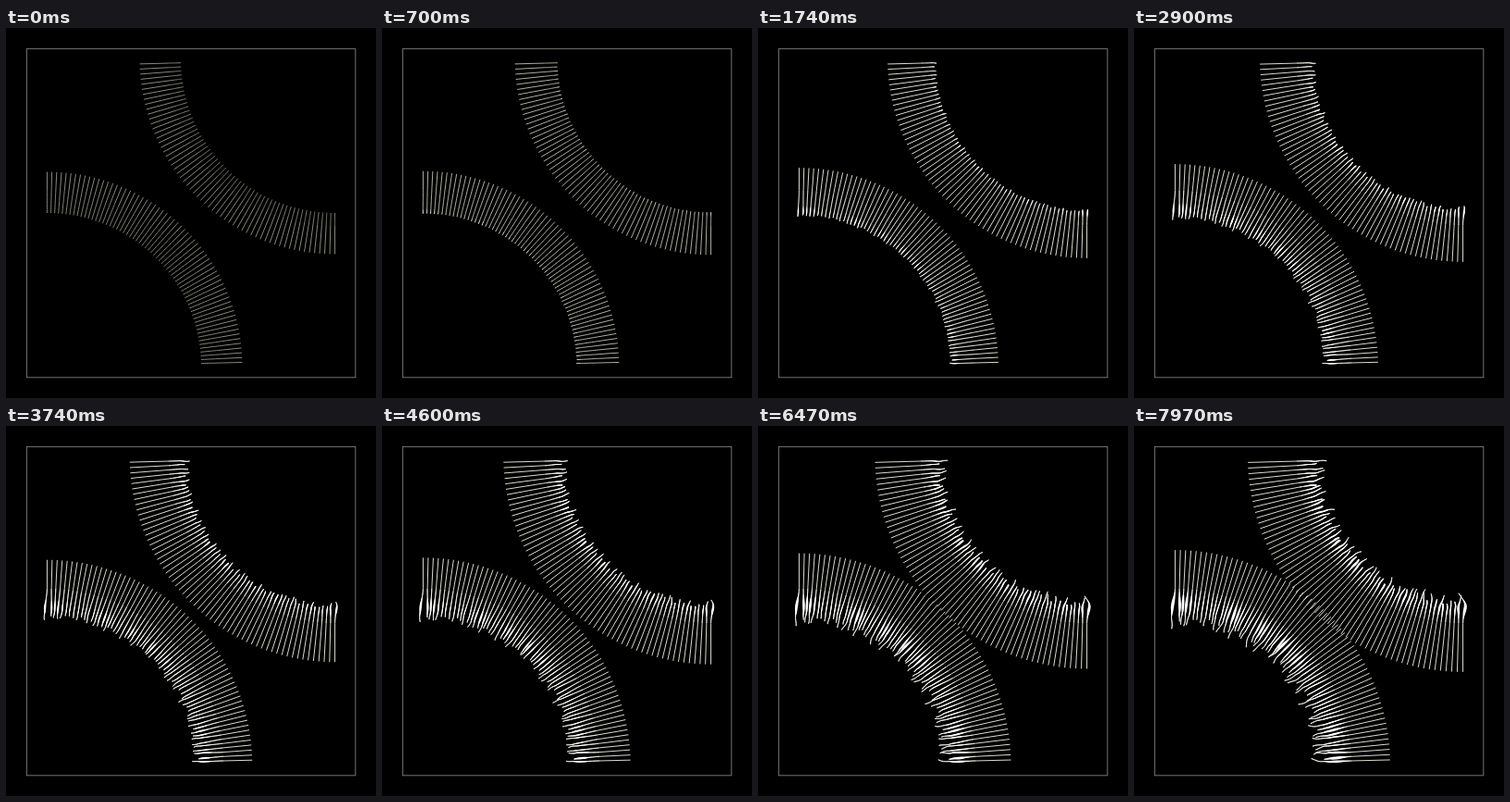
An HTML page that plays this animation: 400 by 400 pixels, repeating every 8000 ms.

```html
<!DOCTYPE html>
<html>
<head>
<meta charset="utf-8">
<title>Growing arcs</title>
<style>
  html, body { margin: 0; width: 100%; height: 100%; overflow: hidden; background: #000; }
  svg { display: block; width: 100%; height: 100%; }
</style>
</head>
<body>
<svg viewBox="0 0 400 400" fill="none">
  <rect x="22.4" y="22.4" width="355.4" height="355.4" stroke="#74746e"/>
  <path id="lines"/>
  <path id="tails" stroke="#fffffa" stroke-width="1.1" stroke-linejoin="round"/>
  <path id="blobs" fill="#fff"/>
</svg>
<script>
const LOOP = 8000, U = 400 / 18;
const INNER = 7.5 * U, OUTER = 9.5 * U;
const GROWTH = [[0, 0], [600, .6], [1230, 2.2], [1740, 4.4], [2900, 8.4], [4600, 13.2], [6470, 18], [8000, 21.5]];

// knots: places along the arc where the strokes gather, as index and strength
const ARCS = [
  {
    count: 64, bend: 191, shift: .35, spread: .5,
    knots: [[0, 1.2], [3, .9], [15, 1], [23, .8], [30, .9], [35, .7], [55, .8], [62, 1]]
  },
  {
    count: 60, bend: 180, shift: -.1, spread: .36,
    knots: [[0, 1.2], [6, .6], [15, .6], [21, .5], [30, .8], [37, .8], [47, .6], [53, .4]]
  }
];

const [lines, tails, blobs] = ['lines', 'tails', 'blobs'].map(id => document.getElementById(id));
const clamp = v => Math.max(0, Math.min(1, v));
const smooth = v => (v = clamp(v), v * v * (3 - 2 * v));

let seed = 11;
function rand() {
  seed = (seed * 16807) % 2147483647;
  return seed / 2147483647;
}

function makeStroke(arc, flip, i) {
  const knot = arc.knots.reduce((sum, [at, amp]) => sum + amp * Math.exp(-(((i - at) / 1.6) ** 2)), 0);
  const s = {
    arc,
    flip,
    angle: i * Math.PI / 2 / arc.count,
    width: .4 + .65 * Math.min(knot, 1.2),
    drift: (rand() - .5) * 2.4,
    curl: (rand() - .5) * .028,
    phase: rand() * 6.3,
    reach: .25 + .6 * rand()
  };
  if (i === 0) Object.assign(s, { reach: .9, drift: -3.2, curl: flip ? .022 : 0 });
  if (i === arc.count - 1) Object.assign(s, { reach: .9, drift: flip ? 0 : .5, curl: flip ? 0 : -.01 });
  return s;
}

const strokes = ARCS.flatMap((arc, flip) => Array.from({ length: arc.count }, (_, i) => makeStroke(arc, flip, i)));

function point(s, r, off = 0) {
  const sin = Math.sin(s.angle), cos = Math.cos(s.angle);
  let x = 2 * U + r * sin + off * cos;
  let y = 16.5 * U - r * cos + off * sin;
  if (s.flip) { x = 400 - x; y = 400 - y; }
  return x.toFixed(2) + ' ' + y.toFixed(2);
}

function growth(t) {
  const k = GROWTH.findIndex(p => p[0] > t);
  const [t0, a] = GROWTH[k - 1], [t1, b] = GROWTH[k];
  return a + (b - a) * (t - t0) / (t1 - t0);
}

function sideways(s, r, g) {
  const q = Math.max(0, INNER - r);
  const sway = s.drift * smooth((s.arc.bend - r) / 24) * clamp(g / 14);
  const wave = .4 * (Math.sin(q * .4 + s.phase) - Math.sin(s.phase));
  return sway + s.curl * q * q + wave;
}

function tailPoints(s, g) {
  const from = s.arc.bend, end = INNER - g * s.reach, n = 14;
  return Array.from({ length: n + 1 }, (_, k) => {
    const r = from + (end - from) * k / n;
    return point(s, r, sideways(s, r, g));
  });
}

function blobPath(s, g) {
  const mid = INNER + g * s.arc.shift, half = 4 + g * s.arc.spread, n = 8;
  const w = s.width * (.5 + .045 * g) * clamp(g / 2);
  const left = [], right = [];
  for (let k = 0; k <= n; k++) {
    const r = Math.max(mid + half * (1 - 2 * k / n), INNER - g * s.reach);
    const off = sideways(s, r, g), bulge = w * Math.sin(Math.PI * k / n);
    left.push(point(s, r, off - bulge));
    right.unshift(point(s, r, off + bulge));
  }
  return 'M' + left.concat(right).join('L') + 'Z';
}

function draw(t) {
  const g = growth(t), glow = smooth(t / 1500);
  let a = '', b = '', c = '';
  for (const s of strokes) {
    const tail = tailPoints(s, g).join('L');
    a += 'M' + point(s, OUTER + g) + 'L' + tail;
    b += 'M' + tail;
    c += blobPath(s, g);
  }
  const mix = (from, to) => Math.round(from + (to - from) * glow);
  const light = mix(135, 218);
  lines.setAttribute('d', a);
  lines.setAttribute('stroke', `rgb(${light},${light},${light - 10})`);
  tails.setAttribute('d', b);
  tails.setAttribute('opacity', .6 * clamp(g / 10));
  blobs.setAttribute('d', c);
}

const start = performance.now();
function frame() {
  draw((performance.now() - start) % LOOP);
  requestAnimationFrame(frame);
}
frame();
</script>
</body>
</html>
```
